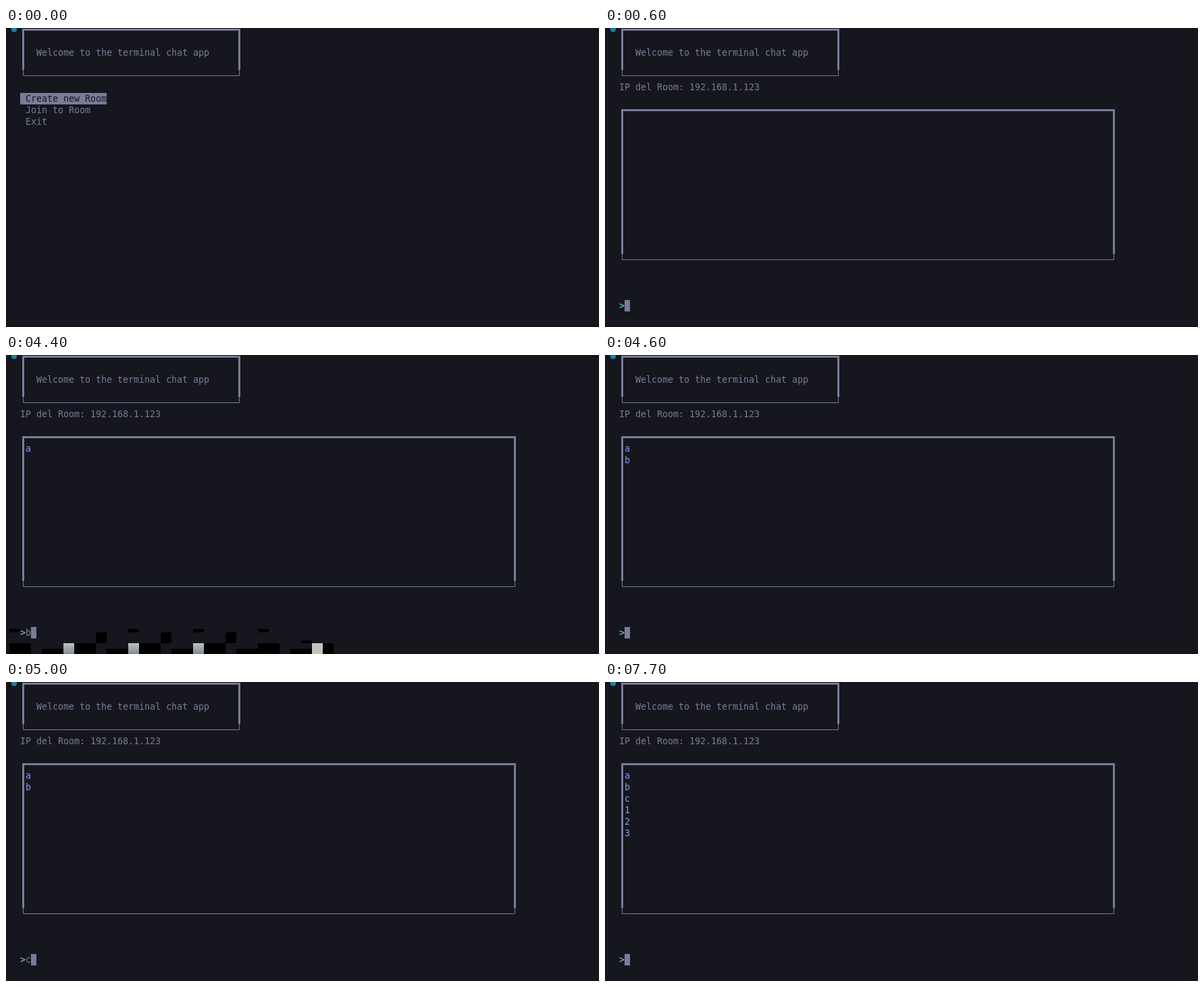
An HTML page that plays this animation: 878x442 px, repeating every 8000 ms.

```html
<!DOCTYPE html>
<html lang="en">
<head>
<meta charset="utf-8">
<title>Terminal chat</title>
<style>
  html, body { margin: 0; width: 100%; height: 100%; overflow: hidden; background: #16161e; }
  svg { display: block; width: 878px; height: 442px; }
  text {
    font: 13.333px "DejaVu Sans Mono", monospace;
    letter-spacing: calc(8px - 1ch);
    white-space: pre;
    fill: #787c99;
  }
  .fg { fill: #787c99; }
  .thick, .thin { fill: none; stroke: #787c99; }
  .thick { stroke-width: 3; }
  .sel { fill: #16161e; }
  .prompt { fill: #73daca; }
  .log text { fill: #7aa2f7; }

  .anim, .log text, .typed text { animation: 8s step-end infinite; }
  .log text, .typed text, .room, .glitch, .photo { opacity: 0; }

  svg .head { animation-name: head; }
  svg .menu { animation-name: menu; }
  svg .room { animation-name: room; }
  svg .cursor { animation-name: cursor; }
  svg .glitch { animation-name: glitch; }
  svg .photo { animation-name: photo; }
  .log :nth-child(1) { animation-name: log1; }
  .log :nth-child(2) { animation-name: log2; }
  .log :nth-child(3) { animation-name: log3; }
  .log :nth-child(4) { animation-name: log4; }
  .log :nth-child(5) { animation-name: log5; }
  .log :nth-child(6) { animation-name: log6; }
  .typed :nth-child(1) { animation-name: key1; }
  .typed :nth-child(2) { animation-name: key2; }
  .typed :nth-child(3) { animation-name: key3; }
  .typed :nth-child(4) { animation-name: key4; }
  .typed :nth-child(5) { animation-name: key5; }
  .typed :nth-child(6) { animation-name: key6; }
  .typed :nth-child(7) { animation-name: key7; }

  @keyframes head { 0%, 7.5% { opacity: 1 } 6.25% { opacity: 0 } }
  @keyframes menu { 0% { opacity: 1 } 6.25%, 100% { opacity: 0 } }
  @keyframes room { 0% { opacity: 0 } 7.5%, 100% { opacity: 1 } }
  @keyframes glitch { 0%, 56.25%, 100% { opacity: 0 } 55% { opacity: 1 } }
  @keyframes photo { 0%, 62.5%, 100% { opacity: 0 } 61.25% { opacity: 1 } }

  /* a message moves from the input line to the log */
  @keyframes key1 { 0%, 46.25%, 100% { opacity: 0 } 43.75% { opacity: 1 } }
  @keyframes key2 { 0%, 57.5%, 100% { opacity: 0 } 55% { opacity: 1 } }
  @keyframes key3 { 0%, 63.75%, 100% { opacity: 0 } 61.25% { opacity: 1 } }
  @keyframes key4 { 0%, 75%, 100% { opacity: 0 } 70% { opacity: 1 } }
  @keyframes key5 { 0%, 80%, 100% { opacity: 0 } 77.5% { opacity: 1 } }
  @keyframes key6 { 0%, 85%, 100% { opacity: 0 } 82.5% { opacity: 1 } }
  @keyframes key7 { 0%, 96.25%, 100% { opacity: 0 } 90% { opacity: 1 } }
  @keyframes log1 { 0% { opacity: 0 } 46.25%, 100% { opacity: 1 } }
  @keyframes log2 { 0% { opacity: 0 } 57.5%, 100% { opacity: 1 } }
  @keyframes log3 { 0% { opacity: 0 } 63.75%, 100% { opacity: 1 } }
  @keyframes log4 { 0% { opacity: 0 } 75%, 100% { opacity: 1 } }
  @keyframes log5 { 0% { opacity: 0 } 80%, 100% { opacity: 1 } }
  @keyframes log6 { 0% { opacity: 0 } 85%, 100% { opacity: 1 } }
  @keyframes cursor {
    0%, 46.25%, 57.5%, 63.75%, 75%, 80%, 85%, 96.25%, 100% { transform: translateX(0) }
    43.75%, 55%, 61.25%, 70%, 77.5%, 82.5%, 90% { transform: translateX(8px) }
  }
</style>
</head>
<body>
<svg width="878" height="442" viewBox="0 0 878 442">
  <defs>
    <linearGradient id="sky" x2="0" y2="1">
      <stop offset="0" stop-color="#56677a"/><stop offset=".3" stop-color="#34475b"/><stop offset="1" stop-color="#27394c"/>
    </linearGradient>
    <linearGradient id="snow" x2="0" y2="1">
      <stop offset="0" stop-color="#a9aeb0"/><stop offset="1" stop-color="#b3b5b1"/>
    </linearGradient>
    <linearGradient id="hill" x2="0" y2="1">
      <stop offset="0" stop-color="#182c3d"/><stop offset="1" stop-color="#0a1a28"/>
    </linearGradient>
    <linearGradient id="tile" x2="0" y2="1">
      <stop offset="0" stop-color="#bfc1bd"/><stop offset="1" stop-color="#7f8b94"/>
    </linearGradient>
    <filter id="soft" x="-10%" y="-30%" width="120%" height="160%"><feGaussianBlur stdDeviation="2"/></filter>
    <clipPath id="strip"><path d="M0 370h878v72H0z"/></clipPath>
    <clipPath id="patch"><path d="M5 400h480v42H5z"/></clipPath>
    <g id="blocks">
      <g stroke="#000" fill="none">
        <path stroke-width="5" d="M21 335.5h16m160 0h16m80 0h16m80 0h16"/>
        <path stroke-width="16" d="M149 346h16m80 0h16m80 0h16"/>
        <path stroke-width="16" d="M21 362h32m64 0h32m64 0h32m64 0h32m48 0h32m64 0h16"/>
        <path stroke-width="8" d="M0 366h21m48 0h32m64 0h32m64 0h32m64 0h32m48 0h32"/>
        <path stroke-width="4" d="M453 352h16"/>
      </g>
      <path fill="url(#tile)" d="M101 354h16v16h-16zM197 354h16v16h-16zM293 354h16v16h-16z"/>
      <path fill="#c3c3bb" d="M469 354h16v16h-16z"/>
    </g>
  </defs>

  <rect width="878" height="442" fill="#16161e"/>
  <path fill="#101014" d="M0 0h1v442H0zM0 441h878v1H0z"/>
  <circle cx="12" cy="2" r="4" fill="#1b81a8"/>

  <g class="anim head">
    <path class="thick" d="M25.5 62V2.5h320V62"/>
    <path class="thin" d="M25.5 62v8.500h320V62"/>
    <text x="45" y="41">Welcome to the terminal chat app</text>
  </g>

  <g class="anim menu">
    <rect class="fg" x="21" y="96" width="128" height="17"/>
    <text class="sel" x="29" y="109">Create new Room</text>
    <text x="29" y="126">Join to Room</text>
    <text x="29" y="143">Exit</text>
  </g>

  <g class="anim room">
    <text x="21" y="92">IP del Room: 192.168.1.123</text>
    <path class="thick" d="M25.5 334V121.500h728V334"/>
    <path class="thin" d="M25.5 334v8.500h728V334"/>
    <g class="log">
      <text x="29" y="143">a</text>
      <text x="29" y="160">b</text>
      <text x="29" y="177">c</text>
      <text x="29" y="194">1</text>
      <text x="29" y="211">2</text>
      <text x="29" y="228">3</text>
    </g>
    <text class="prompt" x="21" y="415">&gt;</text>
    <g class="typed">
      <text x="29" y="415">a</text>
      <text x="29" y="415">b</text>
      <text x="29" y="415">c</text>
      <text x="29" y="415">1</text>
      <text x="29" y="415">2</text>
      <text x="29" y="415">3</text>
      <text x="29" y="415">4</text>
    </g>
    <rect class="anim cursor fg" x="29" y="402" width="8" height="17"/>
  </g>

  <!-- wallpaper tearing through the window -->
  <g class="anim glitch" clip-path="url(#patch)">
    <use href="#blocks" x="-16" y="72"/>
  </g>
  <g class="anim photo">
    <use href="#blocks"/>
    <g clip-path="url(#strip)">
      <path fill="url(#sky)" d="M0 370h878v72H0z"/>
      <g filter="url(#soft)">
        <path fill="#4a5c6f" d="M-10 384Q90 372 190 390L90 420L-10 450z"/>
        <path fill="#223649" d="M50 446Q130 398 200 392T380 390L400 446z"/>
        <path fill="none" stroke="#142737" stroke-width="4" d="M120 406Q190 386 280 387T385 391"/>
        <path fill="#1a2c3c" d="M365 366h55l-8 50-14 30h-28z"/>
        <path fill="#71808c" d="M480 366h180l-5 15-75 3-90 2z"/>
        <path fill="url(#snow)" d="M418 366h86q-12 22-34 38T398 446l16-40q12-16 4-40z"/>
        <path fill="url(#snow)" d="M650 380h235v70H770z"/>
        <path fill="#5d6d7c" d="M640 366h245v14q-120 4-230 0z"/>
        <path fill="#3a4a59" d="M790 378h90v14l-70 3z"/>
        <path fill="#8f979b" d="M690 392l195 36v20H770z"/>
      </g>
      <path fill="url(#hill)" d="M400 442Q450 408 478 402T520 383L600 384L652 379Q675 396 700 408L762 442z"/>
    </g>
  </g>
</svg>
</body>
</html>
```
